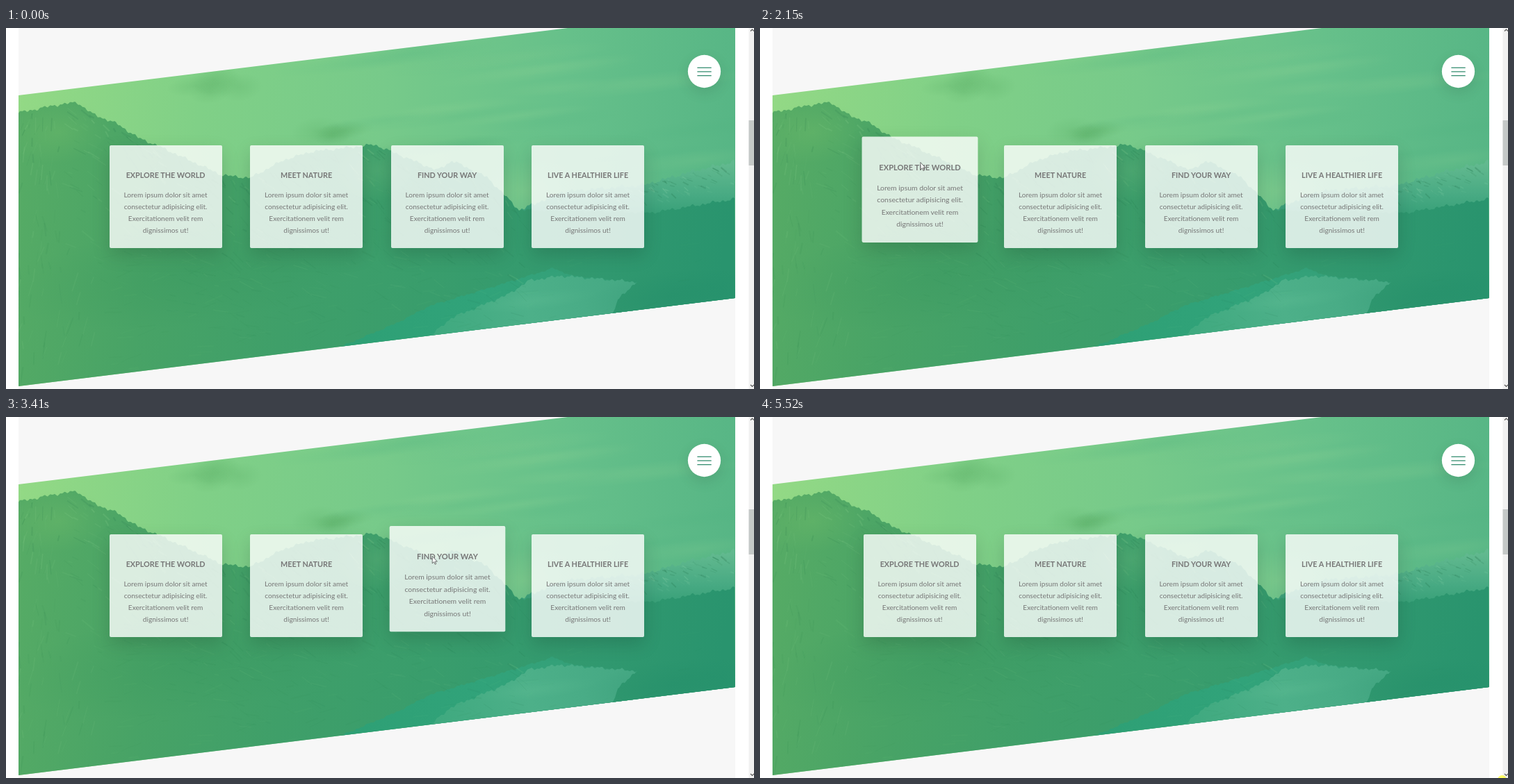
These frames come from a looping animation (1076 px wide and 520 px high, 5.59 s). An HTML page with a canvas:

```html
<!DOCTYPE html>
<html lang="en">
<head>
<meta charset="utf-8">
<title>Feature cards</title>
<style>
  html, body { margin: 0; width: 100%; height: 100%; overflow: hidden; background: #fff; }
  #stage { position: relative; width: 1076px; height: 520px; overflow: hidden; }
  #scene, #overlay { position: absolute; left: 0; top: 0; }
  .card {
    position: absolute; top: 169px; width: 162px; height: 148.3px;
    border-radius: 2px; background: rgba(255, 255, 255, .8);
    box-shadow: 0 10px 27px rgba(0, 0, 0, .15);
    font: 10.125px/1.7 Lato, sans-serif; color: #777; text-align: center;
  }
  .card h3 { margin: 34.3px 0 10.1px; font-size: 10.8px; line-height: 1.7; font-weight: 700; white-space: nowrap; }
  .card p { margin: 0; white-space: nowrap; }
</style>
</head>
<body>
<div id="stage">
  <canvas id="scene" width="1076" height="520"></canvas>
  <svg id="overlay" width="1076" height="520">
    <circle id="click" cx="1067.5" cy="522.5" r="6.5" fill="#ff0" fill-opacity=".6"/>
    <path id="cursor" d="M0 0V10.6L2.4 8.4L4 12L5.5 11.4L4 7.9H7.1Z"
      fill="#fff" fill-opacity=".85" stroke="#444" stroke-width=".75"/>
  </svg>
</div>
<script>
const LOOP = 5590, RISE = 300, LEFT = 18, RIGHT = 1049;
const stage = document.getElementById('stage');
const overlay = document.getElementById('overlay');
const cursor = document.getElementById('cursor');
const click = document.getElementById('click');
const ctx = document.getElementById('scene').getContext('2d');

// Seeded random numbers keep the landscape identical on every load.
let seed = 11;
const rand = () => (seed = (seed * 16807) % 2147483647) / 2147483647;
const spread = (a, b) => a + (b - a) * rand();

// Linear interpolation through keys of the form [position, ...values].
function along(keys, at) {
  const i = Math.max(1, keys.findIndex(k => k[0] >= at));
  const [a, b] = [keys[i - 1], keys[i]];
  const k = (at - a[0]) / (b[0] - a[0]);
  return a.slice(1).map((v, n) => v + (b[n + 1] - v) * k);
}

function gradient(x0, y0, x1, y1, ...colors) {
  const g = ctx.createLinearGradient(x0, y0, x1, y1);
  colors.forEach((c, i) => g.addColorStop(i / (colors.length - 1), c));
  return g;
}

// Fills everything below a rough line through the keys.
function terrain(keys, rough, fill) {
  const start = keys[0][0], end = keys[keys.length - 1][0];
  ctx.beginPath();
  ctx.moveTo(start, 520);
  for (let x = start; x <= end; x += 2) {
    const bump = Math.sin(x * .19) + Math.sin(x * .43 + 1) + Math.sin(x * .87);
    ctx.lineTo(x, along(keys, x)[0] + bump * rough);
  }
  ctx.lineTo(end, 520);
  ctx.fillStyle = fill;
  ctx.fill();
}

function blob(x, y, rx, ry, rgb, alpha) {
  ctx.save();
  ctx.translate(x, y);
  ctx.rotate(-.12);
  ctx.scale(rx, ry);
  const g = ctx.createRadialGradient(0, 0, 0, 0, 0, 1);
  g.addColorStop(0, `rgba(${rgb},${alpha})`);
  g.addColorStop(.5, `rgba(${rgb},${alpha * .5})`);
  g.addColorStop(1, `rgba(${rgb},0)`);
  ctx.fillStyle = g;
  ctx.fillRect(-1, -1, 2, 2);
  ctx.restore();
}

function stroke(x, y, angle, length, rgb, alpha) {
  ctx.strokeStyle = `rgba(${rgb},${alpha})`;
  ctx.lineWidth = spread(.6, 2.2);
  ctx.beginPath();
  ctx.moveTo(x, y);
  ctx.lineTo(x + Math.cos(angle) * length, y + Math.sin(angle) * length);
  ctx.stroke();
}

const LIGHT = '150,215,150', DARK = '32,112,72', CLOUD = '80,165,92';

function drawSky() {
  ctx.fillStyle = gradient(LEFT, 90, 1060, 190, '#93d985', '#80d087', '#77ca8a', '#66c08a', '#56b585');
  ctx.fillRect(LEFT, 0, RIGHT - LEFT, 520);
  for (let i = 0; i < 5; i++) {
    blob(spread(270, 345), spread(72, 98), spread(30, 60), spread(14, 24), CLOUD, .2);
    blob(spread(440, 490), spread(140, 162), spread(25, 45), spread(12, 22), CLOUD, .2);
  }
  for (let i = 0; i < 24; i++) {
    const rgb = rand() < .5 ? LIGHT : '75,175,125';
    blob(spread(450, 1040), spread(20, 190), spread(60, 160), spread(6, 16), rgb, .14);
  }
  blob(745, 235, 80, 45, '150,214,145', .35);
}

function drawFarRange() {
  const ridge = [[740, 262], [800, 236], [918, 226], [985, 207], [RIGHT, 192]];
  terrain(ridge, 1.3, gradient(0, 196, 0, 285, '#62b98f', '#48aa83', '#2f9a72'));
  for (let i = 0; i < 110; i++) {
    const x = spread(770, RIGHT);
    const y = along(ridge, x)[0] + 2 + 34 * rand() ** 2;
    stroke(x, y, spread(.2, .9), spread(4, 12), rand() < .55 ? '140,212,172' : DARK, spread(.08, .25));
  }
}

function drawLand() {
  const ridge = [[LEFT, 122], [72, 111], [102, 107], [125, 124], [160, 138], [190, 158], [217, 169],
    [311, 212], [351, 216], [400, 190], [440, 178], [530, 168], [620, 205], [642, 191],
    [692, 215], [738, 262], [930, 266], [RIGHT, 246]];
  const fill = gradient(LEFT, 190, 1030, 350,
    '#56ab65', '#48a366', '#3f9f69', '#399d6c', '#32996f', '#29946e');
  terrain(ridge, 1, fill);
  drawLake(fill);

  blob(75, 150, 75, 45, '120,195,108', .3);
  blob(535, 205, 60, 45, '105,185,125', .35);
  blob(260, 355, 260, 75, '42,139,86', .2);
  blob(960, 385, 130, 36, '25,132,98', .2);

  // Rock faces are crisp near the ridge and fade into the grass below.
  for (let i = 0; i < 620; i++) {
    const x = spread(LEFT, 740), depth = rand() ** 1.6;
    const y = along(ridge, x)[0] + 5 + depth * 230;
    const slope = x < 80 ? 1.8 - depth * .4 : .8 - depth * .5;
    const lit = rand() < (x < 220 ? .5 : .3);
    stroke(x, y, slope + spread(-.3, .3), spread(6, 24), lit ? LIGHT : DARK,
      spread(.05, .19) * (1 - depth * .7));
  }
  for (let i = 0; i < 160; i++) {
    const x = LEFT + 1010 * rand() ** 1.5;
    stroke(x, spread(310, 510), x < 130 ? spread(1.4, 2) : spread(-.5, 0), spread(10, 30),
      rand() < .5 ? LIGHT : DARK, x < 130 ? .08 : .035);
  }
}

function drawLake(bank) {
  terrain([[470, 464], [562, 425], [610, 400], [690, 376], [787, 346], [815, 357], [908, 366]], .6,
    gradient(500, 450, 890, 360, '#2ea075', '#31a37a', '#379f78'));
  terrain([[608, 446], [640, 418], [722, 384], [752, 364], [798, 357], [908, 366]], 1,
    gradient(620, 440, 880, 360, '#3fa97f', '#4db089', '#46a984'));
  blob(760, 393, 90, 14, '100,193,151', .25);
  terrain([[868, 424], [880, 392], [906, 366], [RIGHT, 350]], 1, bank);
}

function drawPhoto() {
  ctx.save();
  ctx.beginPath();
  [[LEFT, 97], [808, 0], [RIGHT, 0], [RIGHT, 389], [LEFT, 516]].forEach(p => ctx.lineTo(...p));
  ctx.clip();
  drawSky();
  drawFarRange();
  drawLand();
  ctx.restore();
}

function drawMenuButton() {
  ctx.save();
  ctx.shadowColor = 'rgba(0,0,0,.1)';
  ctx.shadowBlur = 20;
  ctx.shadowOffsetY = 6.75;
  ctx.fillStyle = '#fff';
  ctx.beginPath();
  ctx.arc(1004.5, 62.5, 23.65, 0, 7);
  ctx.fill();
  ctx.restore();
  ctx.fillStyle = '#2f8a6c';
  for (let i = 0; i < 3; i++) ctx.fillRect(994.4, 56.6 + 5.7 * i, 20.3, 1.25);
}

function drawScrollbar() {
  ctx.fillStyle = '#f1f1f1';
  ctx.fillRect(1068.5, 0, 7.5, 520);
  ctx.fillStyle = '#c4c8c7';
  ctx.fillRect(1068.5, 133, 7.5, 65);
  ctx.strokeStyle = '#555';
  ctx.lineWidth = 1.2;
  for (const [y, dy] of [[4.5, -2.5], [514, 2.5]]) {
    ctx.beginPath();
    ctx.moveTo(1071, y);
    ctx.lineTo(1073.5, y + dy);
    ctx.lineTo(1076, y);
    ctx.stroke();
  }
}

ctx.fillStyle = '#fff';
ctx.fillRect(0, 0, 1076, 520);
ctx.fillStyle = '#f7f7f7';
ctx.fillRect(LEFT, 0, RIGHT - LEFT, 520);
drawPhoto();
drawMenuButton();
drawScrollbar();

// Each card rises while the pointer is over it.
const cards = [
  ['EXPLORE THE WORLD', 1573, 2370],
  ['MEET NATURE', 2465, 3090],
  ['FIND YOUR WAY', 3195, 3870],
  ['LIVE A HEALTHIER LIFE', 3935, 4890],
].map(([title, enter, leave], i) => {
  const el = document.createElement('div');
  el.className = 'card';
  el.style.left = 148.6 + i * 202.5 + 'px';
  el.innerHTML = `<h3>${title}</h3><p>Lorem ipsum dolor sit amet<br>consectetur adipisicing elit.` +
    '<br>Exercitationem velit rem<br>dignissimos ut!</p>';
  stage.insertBefore(el, overlay);
  return { el, enter, leave };
});

// Pointer keys: time, x, y
const path = [
  [740, 128, 482], [980, 80, 330], [1230, 96, 192], [1370, 116, 160], [1650, 191.5, 190],
  [2150, 230.5, 193.5], [2360, 312, 198], [3050, 505.5, 198.5], [3970, 780, 203],
  [4300, 845.5, 221], [4765, 845.5, 221], [5200, 1070, 522],
];

// cubic-bezier(.25, .1, .25, 1)
function ease(x) {
  if (x <= 0) return 0;
  if (x >= 1) return 1;
  let lo = 0, hi = 1, u = .5;
  for (let i = 0; i < 24; i++) {
    u = (lo + hi) / 2;
    const px = .75 * u * (1 - u) + u ** 3;
    if (px < x) lo = u; else hi = u;
  }
  return .3 * u * (1 - u) ** 2 + 3 * u * u * (1 - u) + u ** 3;
}

function render(t) {
  for (const { el, enter, leave } of cards) {
    const lift = t < leave ? ease((t - enter) / RISE) : 1 - ease((t - leave) / RISE);
    el.style.transform = lift ? `translateY(${-10.3 * lift}px) scale(${1 + .03 * lift})` : 'none';
  }
  const visible = t >= 740 && t < 5200;
  cursor.style.display = visible ? '' : 'none';
  if (visible) cursor.setAttribute('transform', `translate(${along(path, t)})`);
  click.style.display = t >= 5520 ? '' : 'none';
}

const start = performance.now();
function tick() {
  render((performance.now() - start) % LOOP);
  requestAnimationFrame(tick);
}
tick();
</script>
</body>
</html>
```
